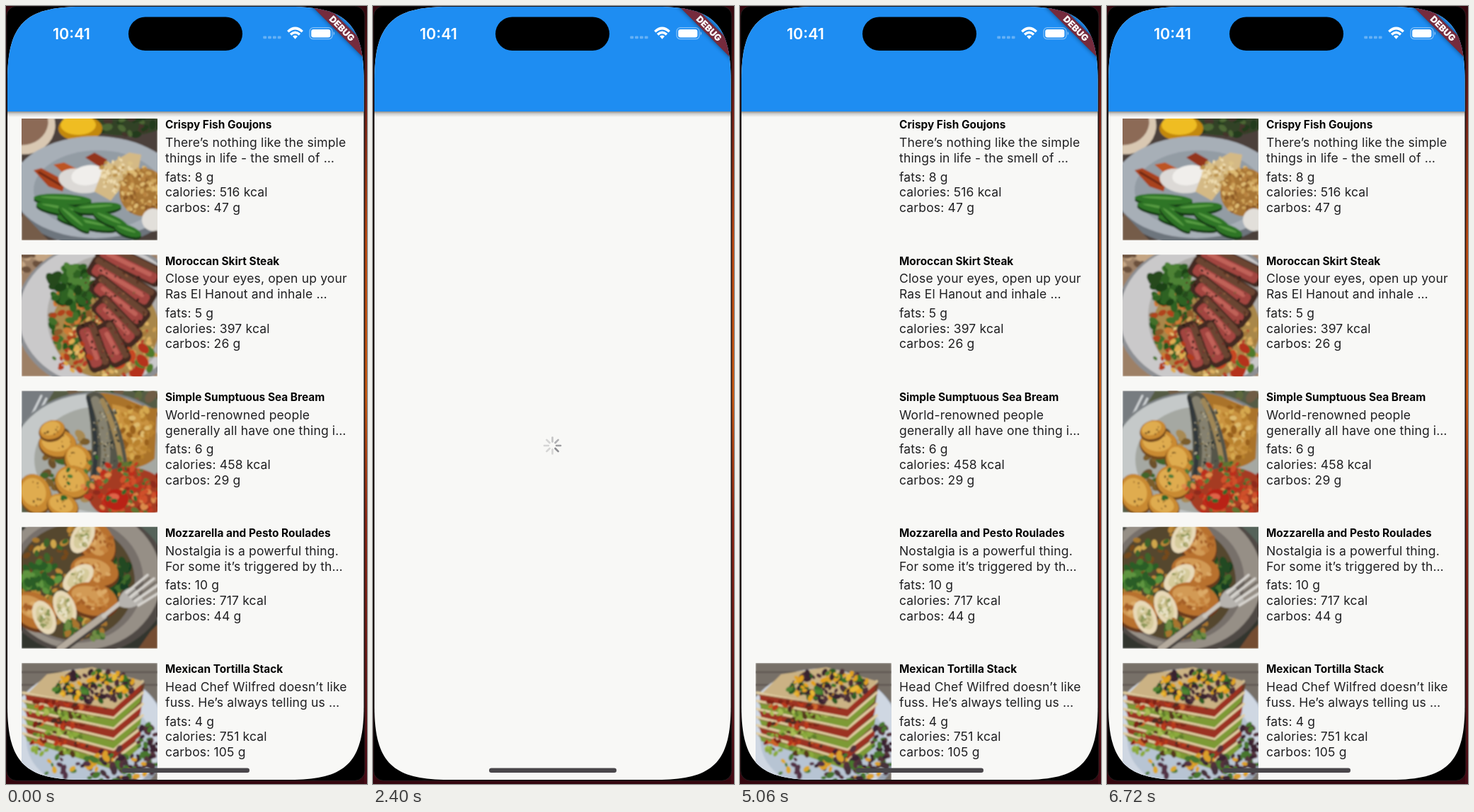
An HTML page for the animation above (6740 ms loop, 510 by 1099 pixels).

```html
<!DOCTYPE html>
<html lang="en">
<head>
<meta charset="utf-8">
<title>Recipe list</title>
<style>
  html, body { margin: 0; width: 100%; height: 100%; overflow: hidden; background: #30060f; }
  svg { display: block; }
  text { font-family: Inter, Roboto, sans-serif; white-space: pre; }
  .title { font-size: 15.4px; font-weight: 700; fill: #050505; }
  .body { font-size: 17.5px; letter-spacing: .16px; fill: #1f1f21; }
  .clock { font-size: 21.5px; font-weight: 600; fill: #fff; }
  .debug { font-size: 12.8px; font-weight: 900; fill: #fff; text-anchor: middle; }
</style>
</head>
<body>
<svg id="stage" width="510" height="1099" viewBox="0 0 510 1099">
  <defs>
    <linearGradient id="edge" x2="0" y2="1">
      <stop offset="0" stop-color="#32080f"/>
      <stop offset=".12" stop-color="#6d1a14"/>
      <stop offset=".3" stop-color="#b8460f"/>
      <stop offset=".5" stop-color="#c4560f"/>
      <stop offset=".66" stop-color="#8a2413"/>
      <stop offset="1" stop-color="#450a15"/>
    </linearGradient>
    <linearGradient id="drop" x2="0" y2="1">
      <stop offset="0" stop-opacity=".42"/>
      <stop offset=".4" stop-opacity=".16"/>
      <stop offset="1" stop-opacity="0"/>
    </linearGradient>
    <filter id="soft"><feGaussianBlur stdDeviation=".9"/></filter>
    <filter id="glow" x="-20%" y="-60%" width="140%" height="220%"><feGaussianBlur stdDeviation="3"/></filter>
    <clipPath id="screen">
      <path d="M2 105C2 26 27 1 106 1H401.500C480.500 1 505.500 26 505.500 105V989C505.500 1068 480.500 1093 401.500 1093H106C27 1093 2 1068 2 989Z"/>
    </clipPath>
  </defs>
  <rect width="510" height="1099" fill="#35070f"/>
  <rect x="506" width="4" height="1099" fill="url(#edge)"/>
  <rect x=".8" y=".3" width="506" height="1094" rx="14" fill="#000" stroke="#2c2425" stroke-width=".8"/>
  <g clip-path="url(#screen)">
    <rect width="510" height="1099" fill="#f8f8f6"/>
    <g id="list"></g>
    <g id="spinner" transform="translate(253.500 621)" stroke="#3c3c44" stroke-width="2.600" stroke-linecap="round"></g>
    <rect y="149" width="510" height="8" fill="url(#drop)"/>
    <rect width="510" height="149" fill="#1e8df2"/>
    <g transform="translate(505.500 1) rotate(45)">
      <rect x="-58" y="35.900" width="116" height="15.400" opacity=".5" filter="url(#glow)"/>
      <rect x="-58" y="35.900" width="116" height="15.400" fill="#752b3d"/>
      <text class="debug" y="48.200">DEBUG</text>
    </g>
  </g>
  <text class="clock" x="66" y="46.800">10:41</text>
  <rect x="173" y="15.500" width="161" height="47.500" rx="23.750"/>
  <g id="signal" fill="#fff" opacity=".32"></g>
  <g fill="none" stroke="#fff" stroke-width="3.600">
    <path d="M398.300 36.200Q408.500 26.800 418.700 36.200M402.100 40.400Q408.500 34.400 414.900 40.400"/>
    <path d="M405 42.800Q408.500 40 412 42.800L408.500 46.800Z" fill="#fff" stroke="none"/>
  </g>
  <rect x="429" y="30.700" width="32" height="16" rx="5" fill="none" stroke="#fff" stroke-width="1.200" opacity=".45"/>
  <path d="M462.700 36q3 2.700 0 5.400z" fill="#fff" opacity=".5"/>
  <rect x="431.200" y="32.900" width="27.200" height="11.600" rx="3.200" fill="#fff"/>
  <rect x="164" y="1076.500" width="180" height="6.400" rx="3.200" fill="#49464a"/>
</svg>
<script>
const $ = id => document.getElementById(id);
const LOOP = 6740, CLEARED = 320, LISTED = 3920;
const LOADED = [5440, 5300, 5420, 5340, 4480];

const poly = (points, fill) => `<polygon points="${points}" fill="${fill}"/>`;
const path = (d, fill) => `<path d="${d}" fill="${fill}"/>`;
const line = (d, color, w) =>
  `<path d="${d}" fill="none" stroke="${color}" stroke-width="${w}" stroke-linecap="round"/>`;
const oval = (x, y, rx, ry, fill, turn = 0) =>
  `<ellipse rx="${rx}" ry="${ry}" fill="${fill}" transform="translate(${x} ${y}) rotate(${turn})"/>`;
const fill = color => `<rect width="192" height="172" fill="${color}"/>`;

function random(seed) {
  return () => (seed = seed * 16807 % 2147483647) / 2147483647;
}

// Small pieces strewn over an elliptical patch.
function strew(seed, count, x, y, rx, ry, size, colors) {
  const next = random(seed * 7919);
  let out = '';
  for (let i = 0; i < count; i++) {
    const a = next() * 2 * Math.PI, r = Math.sqrt(next()), s = size * (.6 + next() * .7);
    out += oval((x + rx * r * Math.cos(a)).toFixed(1), (y + ry * r * Math.sin(a)).toFixed(1),
      s.toFixed(1), (s * .65).toFixed(1), colors[Math.floor(next() * colors.length)], Math.floor(next() * 180));
  }
  return out;
}

function bean(x, y, len, turn) {
  return oval(x, y + 3, len, 8, '#173a17', turn) + oval(x, y, len, 7.5, '#2f7426', turn) +
    oval(x - 2, y - 2, len * .7, 1.8, '#579c43', turn);
}

function slice(x, y, len, thick, turn) {
  return `<g transform="translate(${x} ${y}) rotate(${turn})">` +
    `<rect x="${-len / 2}" y="${-thick / 2}" width="${len}" height="${thick}" rx="8" fill="#432a20"/>` +
    `<rect x="${-len / 2 + 4}" y="${-thick / 2 + 2}" width="${len - 10}" height="${thick * .3}" rx="4" fill="#6b4431"/>` +
    `<rect x="${-len / 2 + 7}" y="${-thick / 2 + 11}" width="${len - 14}" height="${thick - 15}" rx="5" fill="#a24440"/>` +
    `<rect x="${-len / 2 + 14}" y="${-thick / 2 + 13}" width="${len - 30}" height="${thick * .2}" rx="3" fill="#c06259"/></g>`;
}

function potato(x, y, rx, ry, turn) {
  return oval(x, y + 2, rx + 1, ry + 2, '#74481a', turn) + oval(x, y, rx, ry, '#c98a32', turn) +
    oval(x - 2, y - 2, rx * .78, ry * .72, '#dfac50', turn) +
    strew(x + y, 7, x, y, rx * .7, ry * .7, 1.5, ['#5b3c18', '#9a6a26']);
}

function fishPlate() {
  return fill('#4b403b') + oval(145, 8, 55, 16, '#334227') + strew(3, 22, 145, 10, 45, 14, 6, ['#243b1f', '#4d6836', '#45352c']) +
    oval(6, 12, 42, 38, '#d9c8b2', -18) + oval(4, 8, 34, 29, '#8c6a56', -18) +
    oval(83, 14, 31, 18, '#c2880e') + oval(80, 9, 25, 14, '#efbd24') +
    oval(104, 103, 118, 77, '#6d757d') + oval(104, 97, 118, 72, '#a7afb7') +
    oval(108, 101, 91, 56, '#939ca4') + path('M0 132L38 172H0Z', '#745b49') +
    poly('17,73 28,70 62,88 58,103 38,96', '#a9431a') + poly('45,65 60,62 88,76 84,91 66,83', '#bd5423') +
    poly('90,55 103,48 121,58 113,70', '#93351a') + line('M25 76L55 94', '#6b2615', 3) +
    oval(83, 88, 31, 17, '#dcd9d6', 10) + oval(94, 80, 24, 14, '#f0eeeb', -10) +
    poly('103,103 116,69 152,48 169,51 165,73 143,94 126,116', '#d4b985') +
    strew(8, 85, 136, 80, 26, 24, 3, ['#eedcb0', '#bd944f', '#dcc287']) +
    oval(172, 104, 34, 34, '#a87636') + strew(9, 110, 172, 102, 32, 33, 3.4, ['#cfa55b', '#8d5a26', '#dfbc75', '#b98440']) +
    oval(186, 143, 16, 16, '#e2dfda') + bean(58, 114, 41, 3) + bean(54, 127, 34, 10) + bean(92, 147, 43, 12) +
    bean(107, 126, 34, -4) + bean(74, 141, 28, 40) + bean(126, 143, 27, 24) + bean(150, 158, 20, 20);
}

function steakPlate() {
  return fill('#9d8066') + strew(2, 20, 20, 10, 34, 18, 8, ['#6c513d', '#c4a583']) +
    oval(113, 87, 122, 105, '#8d8f93') + oval(112, 85, 116, 100, '#cac9ca') + oval(122, 88, 86, 88, '#b0aeab') +
    oval(118, 104, 76, 70, '#a98748') +
    strew(4, 90, 72, 94, 32, 54, 6, ['#28591f', '#426f2b', '#b1421f', '#cf7a35', '#8f5a2c']) +
    strew(5, 75, 74, 45, 34, 30, 8, ['#1d4319', '#2f6224', '#4d8236', '#26481e']) +
    strew(6, 190, 130, 128, 66, 46, 3.6, ['#e5c77e', '#cda054', '#b8412a', '#dcb163', '#a87d3c']) +
    strew(7, 16, 160, 150, 32, 20, 9, ['#b5301f', '#c84623', '#507a2c']) +
    slice(153, 13, 101, 30, 26) + slice(142, 39, 105, 31, 31) + slice(139, 66, 94, 31, 38) +
    slice(135, 94, 82, 31, 46) + slice(128, 126, 66, 32, 62) + slice(101, 130, 72, 31, 70) +
    strew(11, 110, 130, 78, 48, 74, 2, ['#2a1b18', '#8b5a3c', '#70302b', '#563323']) +
    strew(12, 24, 72, 142, 28, 22, 4.5, ['#b23c1e', '#e0ad51', '#4b7a30']);
}

function breamPlate() {
  return fill('#555b45') + strew(5, 30, 133, 8, 65, 16, 8, ['#344e2b', '#5d683e', '#6f5c45']) +
    path('M0 0H46L0 75Z', '#777b80') + line('M10 43L28 7M17 46L35 11', '#d0d4d6', 3) +
    oval(104, 99, 124, 98, '#7c8184') + oval(103, 95, 117, 91, '#c5c9c9') + oval(111, 97, 93, 75, '#a5a8a2') +
    strew(13, 40, 72, 108, 42, 50, 7, ['#41652a', '#7c5d2a', '#a88a52', '#6c512a']) +
    potato(51, 74, 26, 19, 4) + potato(43, 55, 18, 13, -18) + potato(80, 97, 21, 18, 62) +
    potato(72, 128, 25, 22, 24) + potato(19, 145, 22, 28, -20) + potato(58, 162, 22, 16, 20) +
    path('M108 3C143 2 168 26 192 25L188 96Q170 112 132 112Z', '#aa7329') +
    path('M128 19Q162 25 183 46L176 88Q150 98 134 92Z', '#c9933f') +
    strew(14, 70, 156, 58, 33, 42, 5, ['#d5a850', '#99601f', '#dfbc70', '#b9822f']) +
    path('M91 6Q106-4 116 8Q142 42 150 106Q126 118 96 128Q104 70 91 6Z', '#55544a') +
    line('M104 14Q124 62 117 112', '#85816f', 13) + line('M114 14Q134 54 141 104', '#a08757', 7) +
    line('M94 10Q110 68 102 122', '#33383a', 6) +
    strew(15, 80, 119, 64, 18, 54, 2, ['#2c3433', '#b0a98f', '#72664a', '#948a6c']) +
    oval(150, 146, 56, 38, '#a53a22') +
    strew(16, 150, 146, 140, 58, 38, 4.6, ['#bd2d1d', '#cf5029', '#dc8b4c', '#5f7530', '#8f2a1b', '#c23a22']) +
    oval(134, 154, 17, 15, '#b92219') + oval(130, 150, 8, 5, '#e06347') +
    strew(17, 26, 112, 126, 70, 42, 3.6, ['#33672a', '#557d37']);
}

function roulade(x, y, turn, rx = 33, ry = 24) {
  return oval(x, y + 4, rx + 1, ry + 1, '#6b3a1c', turn) + oval(x, y, rx, ry, '#b8712f', turn) +
    oval(x - 3, y - 4, rx * .75, ry * .6, '#d29a55', turn) +
    strew(x + y, 22, x, y, rx * .7, ry * .7, 4, ['#c5823d', '#a55f28', '#dcaa68']);
}

function cutFace(x, y, turn) {
  return oval(x, y, 15, 25, '#e8d9b8', turn) + oval(x, y, 10, 18, '#d6cb9c', turn) +
    strew(x + y, 24, x, y, 9, 13, 3, ['#8d9758', '#e9e2c6', '#b7ae77']);
}

function rouladePlate() {
  return fill('#33342e') + oval(186, 22, 30, 42, '#55635a') + oval(88, 77, 120, 104, '#4f4a45') +
    oval(85, 73, 112, 101, '#968f86') + oval(77, 76, 95, 88, '#77706a') + oval(75, 78, 85, 82, '#54462d') +
    strew(20, 130, 66, 80, 72, 80, 6, ['#a8782f', '#cfa64c', '#74491f', '#3c632a', '#bd8838']) +
    strew(21, 40, 134, 74, 24, 36, 7, ['#234820', '#406c2b', '#193c20']) +
    roulade(106, 22, 62) + roulade(103, 62, 10, 34, 22) + cutFace(86, 14, 28) + cutFace(80, 72, 52) +
    roulade(100, 102, 12, 36, 23) + roulade(18, 118, 30) + cutFace(61, 114, -22) + cutFace(32, 128, -24) +
    strew(22, 46, 28, 72, 30, 20, 7, ['#2a5d25', '#427a2f', '#5f953f']) +
    strew(23, 34, 90, 143, 32, 16, 5.5, ['#3d692c', '#6f8c45', '#a8752f']) +
    path('M182 148L192 138V172H165Z', '#754d32') +
    line('M54 174L116 128', '#45413e', 13) + line('M54 172L116 126', '#b5ab9e', 9) +
    line('M116 126L146 102', '#cbc6be', 6) + path('M138 100Q146 84 160 86L172 104Q156 120 138 112Z', '#b6b3ae') +
    line('M148 93L178 68M154 99L187 73M160 105L193 82M165 111L196 92', '#d8d5d0', 3.4) +
    line('M151 97L181 72M157 103L190 78', '#514c47', 1.5);
}

function tortillaPlate() {
  let out = fill('#777068') + line('M0 13H192M0 31H192', '#5a534e', 2) +
    oval(94, 105, 112, 97, '#97a2b0') + oval(92, 100, 111, 92, '#cfd7e2') + oval(95, 110, 88, 68, '#b7c4d3') +
    poly('6,48 130,66 174,28 160,118 126,148 10,106', '#6d3a22');
  for (let i = 5; i >= 0; i--) {
    const y = 62 + i * 15, left = 42 + i * 11.5, right = 26 + i * 16;
    const color = i % 2 ? '#7d9a36' : '#9c3320';
    out += poly(`4,${left} 130,${y} 170,${right} 168,${right + 13} 130,${y + 14} 8,${left + 11}`, color) +
      strew(31 + i, 34, 68, (left + y) / 2 + 6, 60, 8, 4, i % 2
        ? ['#a9bd55', '#5d7c2a', '#8bab3c', '#54371f'] : ['#b9391f', '#7d2118', '#cf6529', '#4b2a20']) +
      line(`M2 ${left}L130 ${y}L171 ${right}`, '#e0cda2', 3.6) +
      line(`M4 ${left + 3}L130 ${y + 3}`, '#8f6840', 1.2);
  }
  return out + poly('10,42 36,16 100,6 172,26 130,65', '#cbb284') +
    strew(40, 120, 104, 33, 56, 22, 5, ['#38242f', '#51313a', '#dda126', '#387329', '#4b2e35', '#2d5a23']) +
    strew(41, 22, 100, 30, 56, 22, 4.5, ['#e3a11f', '#4f8430', '#e8b836']) +
    strew(42, 75, 136, 146, 54, 26, 5.6, ['#3a2430', '#54313b', '#dba02a', '#47772d', '#46303a']) +
    strew(43, 30, 178, 112, 14, 26, 5, ['#3a2430', '#54313b', '#47772d']) +
    strew(44, 14, 60, 146, 36, 14, 4.5, ['#523144', '#4e7d32', '#dba82e']);
}

const recipes = [
  ['Crispy Fish Goujons', 'There’s nothing like the simple', 'things in life - the smell of …', 8, 516, 47, fishPlate],
  ['Moroccan Skirt Steak', 'Close your eyes, open up your', 'Ras El Hanout and inhale …', 5, 397, 26, steakPlate],
  ['Simple Sumptuous Sea Bream', 'World-renowned people', 'generally all have one thing i…', 6, 458, 29, breamPlate],
  ['Mozzarella and Pesto Roulades', 'Nostalgia is a powerful thing.', 'For some it’s triggered by th…', 10, 717, 44, rouladePlate],
  ['Mexican Tortilla Stack', 'Head Chef Wilfred doesn’t like', 'fuss. He’s always telling us …', 4, 751, 105, tortillaPlate]
];

$('list').innerHTML = recipes.map(([title, first, second, fats, calories, carbos, photo], i) => {
  const rows = [[first, 40], [second, 62], [`fats: ${fats} g`, 88.5],
    [`calories: ${calories} kcal`, 110.3], [`carbos: ${carbos} g`, 132]];
  return `<g transform="translate(0 ${159 + i * 192.25})">` +
    `<svg class="photo" x="22" width="192" height="172" overflow="hidden"><g filter="url(#soft)">${photo()}</g></svg>` +
    `<text class="title" x="225" y="14.400">${title}</text>` +
    rows.map(([text, y]) => `<text class="body" x="225" y="${y}">${text}</text>`).join('') + '</g>';
}).join('');

$('spinner').innerHTML = Array.from({ length: 8 }, (_, i) =>
  `<line y1="-11.500" y2="-5.600" transform="rotate(${i * 45})"/>`).join('');
$('signal').innerHTML = [0, 1, 2, 3].map(i =>
  `<rect x="${363.3 + i * 6.8}" y="42.500" width="4.800" height="3.800" rx="1"/>`).join('');

const photos = [...document.querySelectorAll('.photo')];
const ticks = [...$('spinner').children];
const show = (node, on) => { node.style.display = on ? '' : 'none'; };

function stepAt(t) {
  const r = t % 140;
  return Math.floor(t / 140) * 3 + (r >= 120 ? 2 : r >= 20 ? 1 : 0);
}

function draw(t) {
  const listed = t < CLEARED || t >= LISTED;
  show($('list'), listed);
  show($('spinner'), !listed);
  photos.forEach((photo, i) => show(photo, t < CLEARED || t >= LOADED[i]));
  const active = Math.floor(stepAt(t) * 2 / 3 + 1) % 8;
  ticks.forEach((tick, i) => {
    const age = (active - i + 8) % 8;
    tick.setAttribute('stroke-opacity', Math.max(47, 147 - age * 25) / 255);
  });
}

const start = performance.now();
function play() {
  draw((performance.now() - start) % LOOP);
  requestAnimationFrame(play);
}
play();
</script>
</body>
</html>
```
